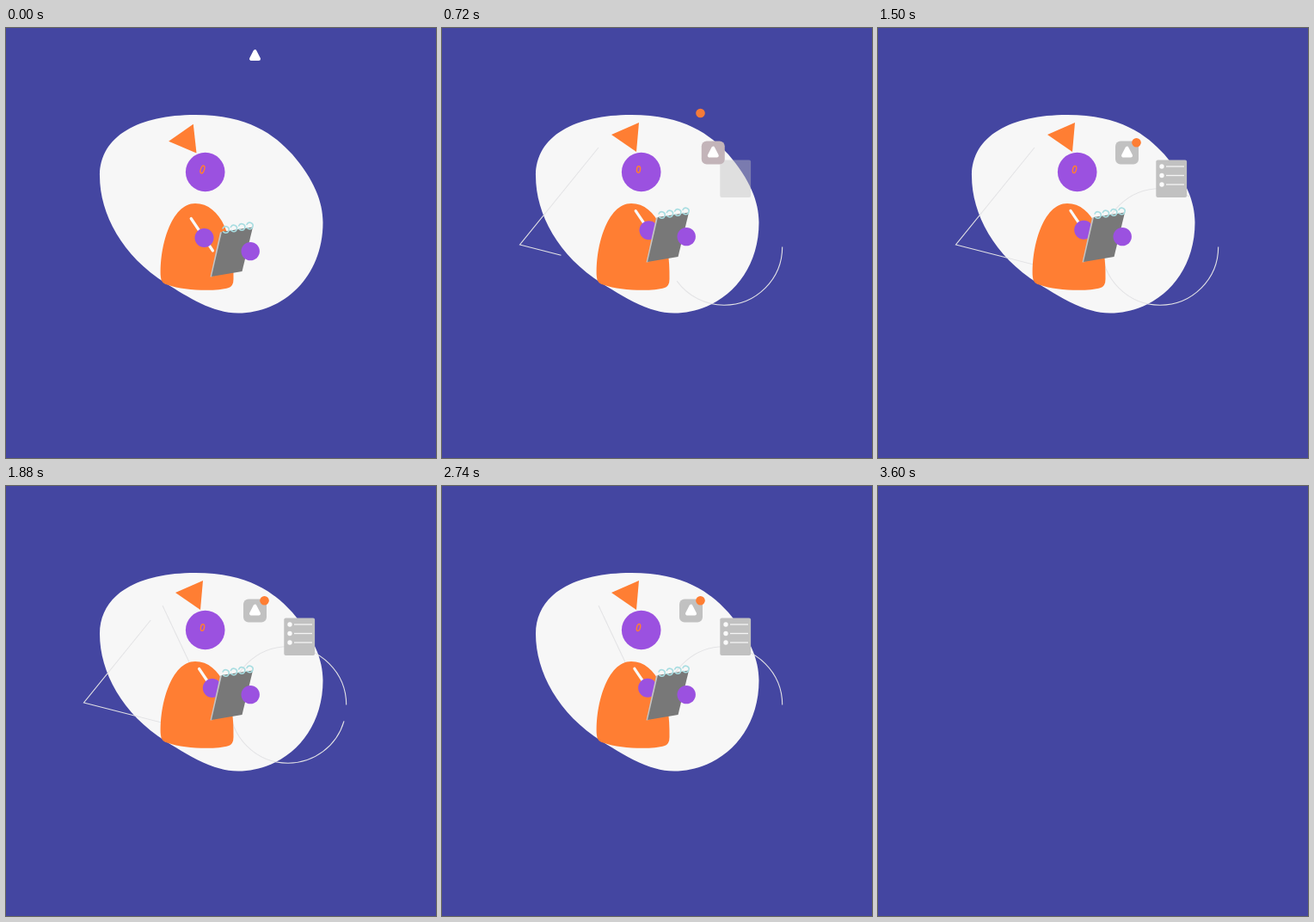
An HTML page for the animation above (3620 ms loop, 500 by 500 pixels).

```html
<!DOCTYPE html>
<html lang="en">
<head>
<meta charset="utf-8">
<title>Note taker</title>
<style>
  html, body { margin: 0; width: 100%; height: 100%; overflow: hidden; background: #4446a1; }
  svg { display: block; width: 100vw; height: 100vh; }
</style>
</head>
<body>
<svg viewBox="0 0 500 500">
  <rect width="500" height="500" fill="#4446a1"/>
  <g id="scene">
    <path fill="#f7f7f7" d="M220 101C282 101 312 124 333 147C358 176 368.5 202 368.5 226C368.5 290 322 331.5 270 331.5C240 331.5 212 313 186 297C135 265 109 216 109 172C109 125 155 101 220 101Z"/>
    <g fill="none" stroke="#e4e4e6" stroke-width="1.1">
      <path class="trim" pathLength="1" d="M182 139L90.5 252L255 294Z"/>
      <circle class="trim" pathLength="1" cx="328" cy="254.5" r="67.7"/>
    </g>
    <path fill="#ff7e33" d="M180 290C178 255 192 204 220 204C250 204 266 245 264.5 292Q264.5 300 259 302C243 307 205 305 189 299Q180 297 180 290Z"/>
    <path id="hat" fill="#ff7e33" d="M197 124L229 110L226 144Z"/>
    <circle cx="231.7" cy="167.5" r="22.8" fill="#9b51e0"/>
    <ellipse id="mouth" fill="none" stroke="#ff7e33" stroke-width="1.5"/>
    <g id="writer">
      <path d="M-15.3 -22.5L10 15" stroke="#f9f9f9" stroke-width="3.2" stroke-linecap="round"/>
      <circle r="11" fill="#9b51e0"/>
    </g>
    <g id="pad">
      <path fill="#c4c4c4" d="M249 220.5L252 220L241 272L237.5 272.5Z"/>
      <path fill="#787878" d="M251 220L287 214.5L274.5 266L239 272Z"/>
      <g id="rings" fill="none" stroke="#a8dde1" stroke-width="1.6" stroke-linecap="round"></g>
      <circle cx="284.2" cy="242.6" r="10.7" fill="#9b51e0"/>
    </g>
    <g id="doc">
      <rect x="323.3" y="153.5" width="35.8" height="43.5" rx="2" fill="#c1c1c1"/>
      <g id="rows"></g>
    </g>
    <rect id="tile" x="276" y="131.5" width="27" height="27" rx="6"/>
    <path id="peak" fill="#fff" stroke="#fff" stroke-width="4" stroke-linejoin="round" d="M289.5 139.7L285 148.5H294Z"/>
    <circle id="dot" r="5.3" fill="#ff7e33"/>
  </g>
</svg>
<script>
const LOOP = 3620, BLANK = 3600;
const $ = id => document.getElementById(id);
const set = (el, attrs) => { for (const k in attrs) el.setAttribute(k, attrs[k]); };
const add = (tag, parent, attrs) => {
  const el = document.createElementNS('http://www.w3.org/2000/svg', tag);
  set(el, attrs);
  parent.appendChild(el);
  return el;
};
const ramp = (t, a, b) => Math.min(1, Math.max(0, (t - a) / (b - a)));
const sine = (t, a, b) => (1 - Math.cos(Math.PI * ramp(t, a, b))) / 2;
const mix = (a, b, p) => a + (b - a) * p;
// 1 at rest, 0 while working
const rest = (t, inEnd, outStart) => 1 - sine(t, 0, inEnd) + sine(t, outStart, 3600);

for (let i = 0; i < 4; i++)
  add('path', $('rings'), {
    d: 'M-3.4 -1.6A3.7 3.7 0 1 1 -1.2 3.4L-3 2.2',
    transform: `translate(${255.5 + 9.3 * i} ${217.6 - 1.5 * i})`
  });

const rows = [161, 171.5, 182].map(y => ({
  bullet: add('circle', $('rows'), { cx: 330, cy: y, fill: '#fafafa' }),
  line: add('path', $('rows'), { stroke: '#f4f4f4', 'stroke-width': 1.3 }),
  y
}));
const trims = document.querySelectorAll('.trim');

function draw(t) {
  $('scene').style.display = t < BLANK ? '' : 'none';

  const end = ramp(t, 0, 1800), start = ramp(t, 1800, 3600);
  trims.forEach(el => {
    set(el, { 'stroke-dasharray': `${end - start} 2`, 'stroke-dashoffset': -start });
    el.style.display = end - start > 0.001 ? '' : 'none';
  });

  set($('hat'), { transform: `rotate(${-11.3 * rest(t, 620, 3100)} 231.7 167.5)` });
  set($('pad'), { transform: `translate(0 ${17 * rest(t, 620, 2980)})` });

  const swing = -Math.cos(2 * Math.PI * (t - 1140) / 280);
  const idle = rest(t, 700, 2840);
  const hx = mix(238.8 + 1.7 * swing, 230.5, idle);
  const hy = mix(234.7 + 0.5 * swing, 244, idle);
  set($('writer'), { transform: `translate(${hx} ${hy})` });

  const talk = (1 - swing) / 2;
  set($('mouth'), {
    rx: 2, ry: 3.7 + 0.9 * talk,
    transform: `translate(228.5 164.5) rotate(${8 + 12 * talk})`
  });

  const out = 1 - ramp(t, 3000, 3360);
  set($('doc'), { opacity: ramp(t, 560, 930) * out });
  rows.forEach(({ bullet, line, y }, i) => {
    const p = sine(t, 760 + 70 * i, 960 + 70 * i);
    set(bullet, { r: 2.7 * p });
    set(line, { d: `M335 ${y}H${335 + 21 * p}`, opacity: p > 0 ? 1 : 0 });
  });

  const slide = 26 * Math.exp((720 - t) / 110);
  const tint = 1 - ramp(t, 720, 950);
  set($('tile'), {
    transform: `translate(${Math.min(slide, 200)} 0)`,
    fill: `rgb(${mix(193, 195, tint)},${mix(193, 180, tint)},${mix(193, 185, tint)})`,
    opacity: ramp(t, 560, 720) * out
  });
  const fall = sine(t, 0, 640);
  set($('peak'), {
    transform: `translate(${Math.min(slide, 26 * fall)} ${-112.5 * (1 - fall)})`,
    opacity: out
  });
  set($('dot'), {
    cx: 300.5 + 3.4 * (sine(t, 760, 1100) - sine(t, 1110, 1350)),
    cy: mix(70, 133.3, sine(t, 560, 900)),
    opacity: ramp(t, 550, 730) * out
  });
}

function tick(now) {
  draw(now % LOOP);
  requestAnimationFrame(tick);
}
draw(0);
requestAnimationFrame(tick);
</script>
</body>
</html>
```
